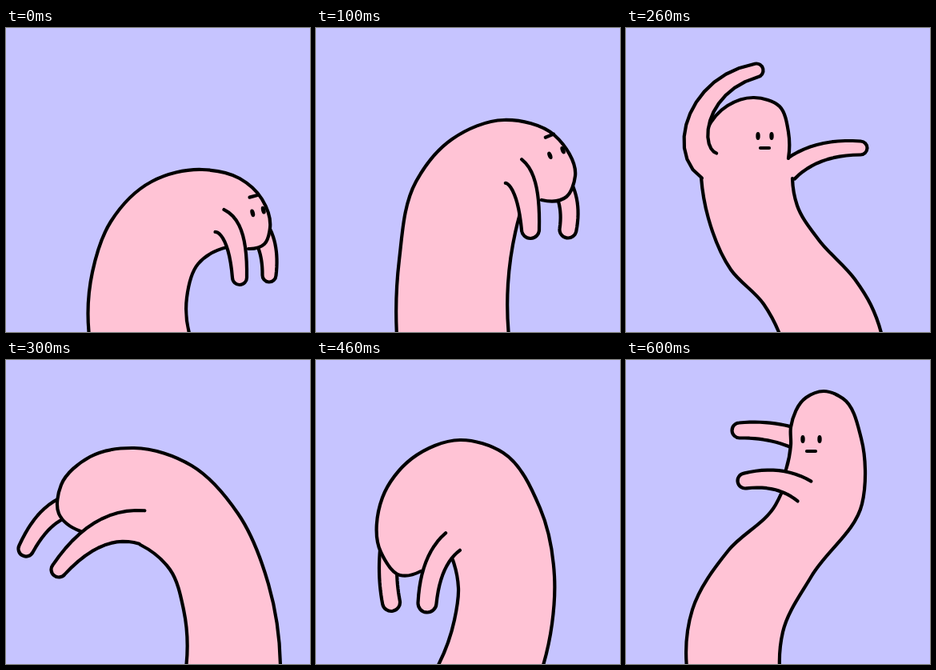
An HTML page that plays this animation: 380x380 px, repeating every 700 ms.

```html
<!DOCTYPE html>
<html lang="en">
<head>
<meta charset="utf-8">
<title>Wobbly dancer</title>
<style>
  html, body { margin: 0; width: 100%; height: 100%; overflow: hidden; background: #c6c4ff; }
  #strip { display: flex; width: 2660px; height: 380px; animation: flip 700ms steps(7) infinite; }
  #strip svg { flex: none; width: 380px; height: 380px; overflow: hidden; }
  path { stroke-linecap: round; stroke-linejoin: round; stroke-width: 4.2; }
  .skin { fill: #ffc3d5; }
  .ink { fill: none; stroke: #000; }
  @keyframes flip { to { transform: translateX(-2660px); } }
</style>
</head>
<body>
<div id="strip"></div>
<script>
const NS = 'http://www.w3.org/2000/svg';
const strip = document.getElementById('strip');
let pose;

const mix = (a, b, t) => a.map((v, k) => v + (b[k] - v) * t);
const points = text => text.trim().split(/\s+/).map(s => s.split(',').map(Number));

function add(tag, attrs, parent = pose) {
  const el = document.createElementNS(NS, tag);
  for (const key in attrs) el.setAttribute(key, attrs[key]);
  return parent.appendChild(el);
}

function newPose() {
  pose = add('svg', { viewBox: '0 0 380 380' }, strip);
}

// Smooth curve whose tangents are weighted by the distance between points
function curve(p) {
  const last = p.length - 1;
  const gap = [], dir = [];
  for (let i = 0; i < last; i++) {
    const d = p[i + 1].map((v, k) => v - p[i][k]);
    gap[i] = Math.hypot(...d);
    dir[i] = d.map(v => v / gap[i]);
  }
  const tan = p.map((_, i) => i && i < last
    ? mix(dir[i - 1], dir[i], gap[i - 1] / (gap[i - 1] + gap[i])) : dir[i ? last - 1 : 0]);
  if (last > 1) {
    tan[0] = mix(tan[1], dir[0], 2);
    tan[last] = mix(tan[last - 1], dir[last - 1], 2);
  }
  let d = p[0].join();
  for (let i = 0; i < last; i++) {
    const out = p[i].map((v, k) => v + tan[i][k] * gap[i] / 3);
    const into = p[i + 1].map((v, k) => v - tan[i + 1][k] * gap[i] / 3);
    d += ` C${out} ${into} ${p[i + 1]}`;
  }
  return d;
}

// All lines share one fill, with no ink across the gaps between them
function paint(lines) {
  add('path', { class: 'skin', d: 'M' + lines.join(' L') });
  add('path', { class: 'ink', d: 'M' + lines.join(' M') });
}

const body = text => paint(text.split('|').map(s => curve(points(s))));

function bezier(p, t) {
  return p.length === 1 ? p[0] : bezier(p.slice(1).map((q, i) => mix(p[i], q, t)), t);
}

// Tapered tube along a Bezier spine, open at the shoulder and round at the tip
function arm(text, shoulder, tip) {
  const spine = points(text), left = [], right = [], steps = 12;
  for (let i = 0; i <= steps; i++) {
    const t = i / steps, r = shoulder + (tip - shoulder) * t;
    const [x, y] = bezier(spine, t);
    const a = bezier(spine, t - 0.01), b = bezier(spine, t + 0.01);
    const angle = Math.atan2(b[1] - a[1], b[0] - a[0]);
    const dx = Math.sin(angle) * r, dy = -Math.cos(angle) * r;
    left.push([x + dx, y + dy]);
    right.unshift([x - dx, y - dy]);
  }
  paint([`${left.join(' L')} A${tip},${tip} 0 0 1 ${right.join(' L')}`]);
}

function face(x, y, gap, turn = 0, drop = 15) {
  const g = add('g', { transform: `translate(${x} ${y}) rotate(${turn})` });
  for (const side of [-1, 1]) add('ellipse', { cx: side * gap / 2, rx: 2.7, ry: 5 }, g);
  add('path', { class: 'ink', d: `M-5.5,${drop} h11` }, g);
}

// Bent low to the right
newPose();
arm('320,258 331,278 329,309', 12, 8.5);
body(`230,385 226,337 240,295 276,274 |
  303,276 323,270 330,250 320,214 292,188 245,177 182,192 131,242 108,305 104,385`);
arm('267,241 290,250 292,312', 15, 9);
face(315, 229.5, 14, 165, 20);

// Rising on the right
newPose();
arm('309,200 320,222 315,252', 12, 10.5);
body(`241,385 240,320 255,232 |
  282,215 313,211 324,185 298,134 235,115 170,139 125,192 104,290 101,385`);
arm('247,179 266,192 268,252', 18, 11);
face(300.5, 156, 17.5, 158, 23);

// Arms thrown wide
newPose();
arm('202,179 236,148 293,150', 13, 8.5);
body(`193,385 172,345 131,302 103,238 94,187 |
  101,127 127,97 160,87 192,98 203,130 203,163 |
  208,188 214,222 241,265 286,314 306,346 320,385`);
arm('104,172 70,152 88,70 163,53', 18, 8.5);
face(173.5, 135, 17);

// Flung over to the left
newPose();
arm('74,184 46,194 25,236', 13, 9.5);
body(`225,385 222,312 205,262 168,231 |
  93,214 66,192 69,156 105,121 160,110 232,132 290,192 328,280 343,385`);
arm('170,209 115,200 66,262', 21, 9.5);

// Hanging on the left
newPose();
arm('91,238 88,272 94,303', 11, 11);
body(`151,385 173,325 178,285 171,250 |
  131,264 105,269 81,240 83,172 120,123 180,100 234,116 280,185 298,270 295,330 283,385`);
arm('171,227 143,250 139,304', 14, 11.5);

// Turning back up
newPose();
arm('146,166 122,180 95,213', 12, 10.5);
arm('194,205 160,214 132,236', 13, 10);
body(`117,385 163,325 186,270 186,220 | 186,195 179,174 |
  190,166 155,176 126,155 133,123 165,97 208,88 268,112 304,170 313,245 296,335 268,385`);

// Upright, arms to the left
newPose();
arm('212,98 180,86 142,88', 12.5, 9.5);
body(`76,385 83,312 128,238 187,181 194,167 |
  200,137 206,106 206,84 225,47 247,39 271,48 294,98 299,138 295,180 232,270 196,340 192,385`);
arm('223,164 192,143 149,151', 15, 9.5);
face(231.5, 99, 21);
</script>
</body>
</html>
```
